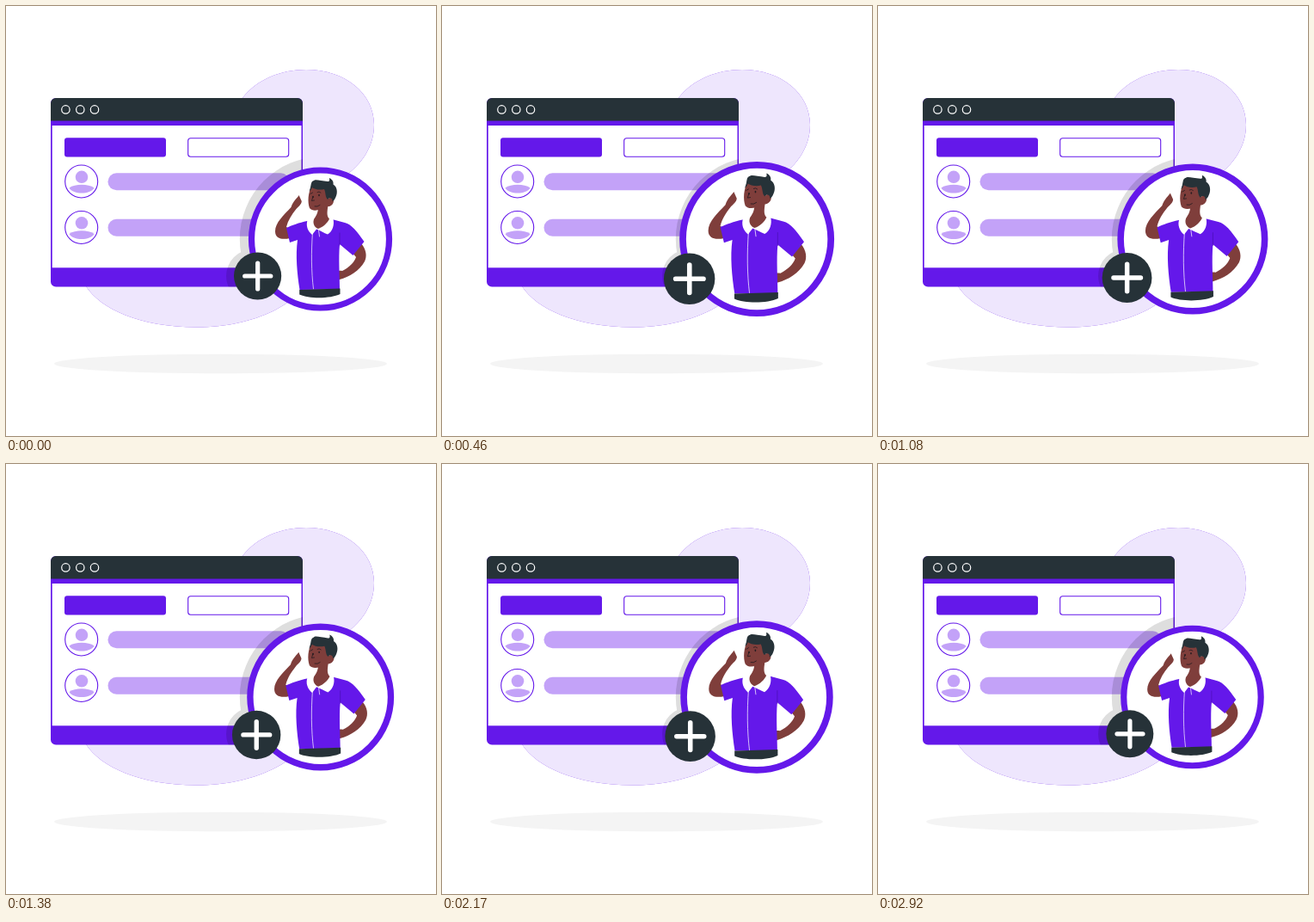
Recreate the animation shown at these times as an HTML page. Size 500 by 500 pixels, loop 2.96 s.

```html
<!DOCTYPE html>
<html lang="en">
<head>
<meta charset="utf-8">
<title>Add user</title>
<style>
  html, body { margin: 0; width: 100%; height: 100%; overflow: hidden; background: #fff; }
  svg { display: block; width: 100%; height: 100%; }
  .purple { fill: #6418ea; }
  .lilac { fill: #c3a2f8; }
  .dark { fill: #263238; }
  .white { fill: #fff; }
  .skin { fill: #7f3e3b; }
  .line { fill: none; stroke-linecap: round; stroke-linejoin: round; }
</style>
</head>
<body>
<svg viewBox="0 0 500 500">
  <defs>
    <clipPath id="windowClip"><rect x="52" y="107" width="293" height="219.5" rx="6"/></clipPath>
    <path id="blob" d="M275 107C292 85 320 74 349 74C395 74 428 102 428 138C428 165 412 185 395 197C370 215 372 260 355 310C345 345 290 373.5 222 373.5C155 373.5 110 352 93 326V310Z"/>
    <g id="row">
      <circle class="white" cx="87.7" cy="204" r="19" stroke="#6418ea" stroke-width="1.1"/>
      <circle class="lilac" cx="88" cy="198.8" r="7.3"/>
      <path class="lilac" d="M73.5 211.5C80 206.6 96 206.6 102.500 211.500C98 219.500 78 219.500 73.500 211.500Z"/>
      <rect class="lilac" x="118.500" y="194.200" width="211" height="20" rx="10"/>
    </g>
  </defs>

  <ellipse cx="249.500" cy="416" rx="193.500" ry="11.300" fill="#f4f4f4"/>
  <use href="#blob" class="purple"/>
  <use href="#blob" class="white" opacity=".89"/>

  <g clip-path="url(#windowClip)">
    <rect class="purple" x="52" y="107" width="293" height="220"/>
    <rect class="dark" x="52" y="107" width="293" height="26.500"/>
    <rect class="white" x="53.700" y="139" width="289.800" height="165.300"/>
    <g fill="none" stroke="#fff" stroke-width="1.200">
      <circle cx="69.400" cy="120.400" r="4.700"/>
      <circle cx="86.300" cy="120.400" r="4.700"/>
      <circle cx="103" cy="120.400" r="4.700"/>
    </g>
    <rect class="purple" x="68" y="153.200" width="118" height="22.200" rx="3"/>
    <rect class="white" x="211.700" y="153.700" width="117" height="21.500" rx="3" stroke="#6418ea" stroke-width="1.100"/>
    <use href="#row"/>
    <use href="#row" y="53.500"/>
    <g opacity=".13">
      <circle cx="367.500" cy="271" r="95.700"/>
      <circle cx="287" cy="314" r="31"/>
    </g>
  </g>

  <g id="badge">
    <circle class="white" cx="365.500" cy="271" r="80"/>
    <g id="man">
      <path class="skin" d="M340.600 220C339 223 334 226.500 331.500 234C323 243 313 252 313 262C313 271 322 272 330 270L328.500 258.500L326 257C328 249 332 243 337.500 236C340 233 343.500 231 343.800 227Z"/>
      <path class="skin" d="M413 276C419 283 420 291 417 297C411 308 399 315 388 318C383 320.500 377 320 376.500 315C378 309 385 307 391 308C399 304 405 298 407 292L402 286Z"/>
      <path class="purple" d="M350 250C341 252 332 255 326 258L330 275L339 272C336.500 290 338.500 311 341.500 330L388 329.500C388 313 386.500 294 388 277L403.500 290L416.500 274C408 262 402 254 394 252L381 248.500Z"/>
      <path class="line" d="M388 264V278" stroke="#4a10b4" stroke-width=".7"/>
      <path class="white" d="M351 248C348 255 351 262 356 266L361 259.500C365 261 370 264 374 265.500C380 262 382 254 380.500 248L374 246L362 248Z"/>
      <path class="skin" d="M363 234C363 241 360 245 358 248C356 254 360 258 363 259C369 257 374 252 376 247.500C372 244 374 237 374.500 231Z"/>
      <path class="line" d="M356.500 263C354.800 286 355 309 357.500 329M363.500 260.500L364.500 268" stroke="#fff" stroke-width=".8" opacity=".85"/>
      <path class="skin" d="M356 208C351 217 350.500 228 353 235C357 239.500 365 238 371 232.500C376 235 381 231 381 226.500C381 222 377 222 375 224L373 207Z"/>
      <path class="dark" d="M354 211C355 207 354.500 204 358 203C359 201 366 203 374 204C377 204 376 202 376 200C380 202 381 205 380.500 207.500C385 210 386 217 383.500 222C382.500 225 380.500 227 379.500 227C380 223 376 222 374 225C371 222 372 217 370 213C364 214.500 359 213 355.500 211C356 213 353 215 352.500 216Z"/>
      <g class="line" stroke="#302024" stroke-width=".9">
        <path d="M354 218.500L356.500 217M362 216.500Q364 215 366 217M359 233Q362 234 365 231.500"/>
        <path d="M357 221.500L355.500 226.500L358.500 226"/>
      </g>
      <ellipse cx="357" cy="222" rx=".8" ry="1.200" fill="#261c20"/>
      <ellipse cx="364" cy="220" rx=".8" ry="1.200" fill="#261c20"/>
      <path class="dark" d="M341.200 330L388.500 328.500V335C377 340.500 352 340.500 341.200 335.500Z"/>
    </g>
    <circle cx="365.500" cy="271" r="80" fill="none" stroke="#6418ea" stroke-width="7.200"/>
    <circle class="dark" cx="292.600" cy="314" r="27.600"/>
    <path class="line" d="M277.700 314H307.800M292.700 299V329" stroke="#fff" stroke-width="5.200"/>
  </g>
</svg>
<script>
const LOOP = 2960;
const CYCLE = 3000;
const PHASE = 50;
const DRAWN_SCALE = 1 + 0.1 * PHASE / 600;
const ORIGIN = [357.5, 271];
const BEATS = [[0, 1], [600, 1.1], [1800, 1], [2400, 1.1], [3000, 1]];
const badge = document.getElementById('badge');

function pulse(time) {
  const end = BEATS.findIndex(([at]) => at > time);
  const [t0, s0] = BEATS[end - 1];
  const [t1, s1] = BEATS[end];
  return s0 + (s1 - s0) * (time - t0) / (t1 - t0);
}

function render(time) {
  const scale = pulse((time % LOOP + PHASE) % CYCLE) / DRAWN_SCALE;
  const [x, y] = ORIGIN;
  badge.setAttribute('transform', `translate(${x} ${y}) scale(${scale}) translate(${-x} ${-y})`);
}

const start = performance.now();
function tick() {
  render(performance.now() - start);
  requestAnimationFrame(tick);
}
tick();
</script>
</body>
</html>
```
